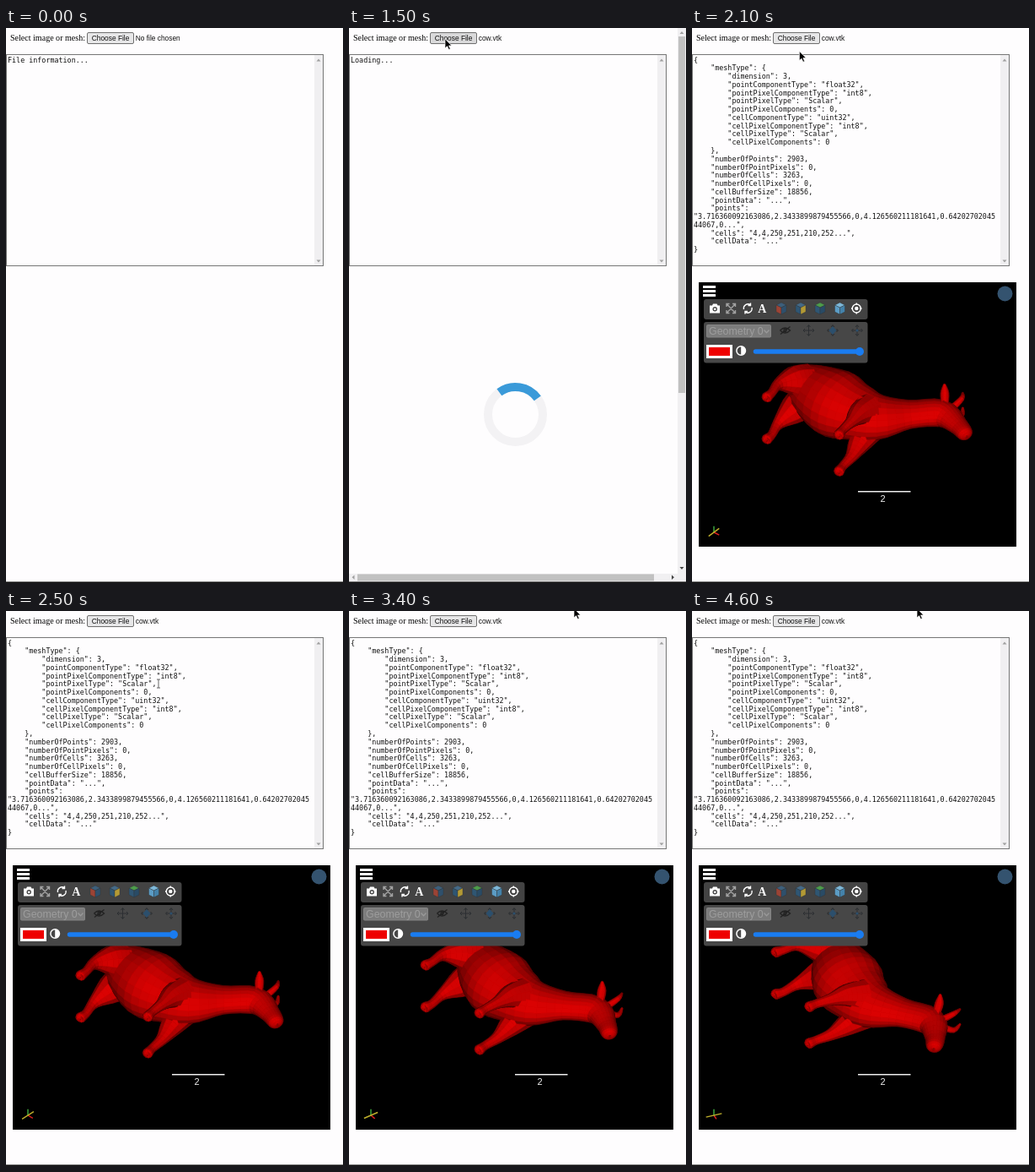
Recreate the animation shown at these times as an HTML page with a canvas. Size 400x657 px, loop 4.7 s.

```html
<!DOCTYPE html>
<html lang="en">
<head>
<meta charset="utf-8">
<title>Mesh viewer</title>
<style>
html, body { margin: 0; width: 100%; height: 100%; overflow: hidden; background: #fefdfe; }
svg, canvas { position: absolute; left: 0; top: 0; }
pre { position: absolute; left: 2px; top: 33.6px; margin: 0; color: #111;
  font: 8.4px/9.77px "DejaVu Sans Mono", monospace; }
.sans { font-family: "Liberation Sans", Arial, sans-serif; }
.serif { font-family: "Liberation Serif", Times, serif; }
</style>
</head>
<body>
<svg width="400" height="657">
  <text class="serif" x="5" y="15" font-size="10.05">Select image or mesh:</text>
  <rect id="button" x="96.5" y="5.5" width="55" height="13" rx="1.5" stroke="#6f6f6f"/>
  <g class="sans" font-size="8.4" fill="#111">
    <text x="101.7" y="15">Choose File</text>
    <text id="file" x="153.7" y="15"></text>
  </g>
  <rect x=".5" y="31.5" width="376" height="250" fill="none" stroke="#767676"/>
  <path d="M366 32h10v249h-10z" fill="#f0eff1"/>
  <path d="M368.5 39.5l2.5-3 2.5 3zM368.5 274.5l2.5 3 2.5-3z" fill="#a0a0a0"/>

  <g id="loading">
    <path d="M390 0h10v656H0v-10h390z" fill="#f1f0f2"/>
    <path d="M391 10h8v422h-8zM10 646.5h352v8H10z" fill="#c1c1c1"/>
    <path d="M392.5 7l2.5-3 2.5 3zM6.5 647.5l-3 2.8 3 2.8z" fill="#a0a0a0"/>
    <path d="M392.5 638l2.5 3 2.5-3zM383 647.5l3 2.8-3 2.8z" fill="#444"/>
    <g fill="none" stroke-width="10">
      <circle cx="197.5" cy="457.5" r="32.5" stroke="#f3f2f4"/>
      <path id="arc" d="M174.52 434.52a32.5 32.5 0 0 1 45.96 0" stroke="#3a9ad9"/>
    </g>
  </g>
  <path d="M0 656.3h400" stroke="#111" stroke-width="1.5"/>
</svg>
<pre id="info"></pre>
<canvas id="scene" width="400" height="657"></canvas>

<svg width="400" height="657">
  <g id="tools">
    <path d="M13 306.5h15M13 311.5h15M13 316.5h15" stroke="#fff" stroke-width="2.8"/>
    <circle cx="371.5" cy="314.5" r="9" fill="#34536f"/>
    <rect x="14" y="321" width="194.5" height="24" rx="3" fill="#434343"/>
    <rect x="14" y="348" width="194.5" height="48.5" rx="3" fill="#474747"/>

    <g fill="#fff">
      <path d="M21 328.5h3l1-2h4.5l1 2h2.5v9H21z"/>
      <circle cx="27.2" cy="332.8" r="2.7" fill="#434343"/><circle cx="27.2" cy="332.8" r="1.4"/>
      <text class="serif" x="78.3" y="337" font-size="14" font-weight="bold">A</text>
      <circle cx="195.3" cy="332" r="2.2"/>
    </g>
    <g fill="none" stroke="#fff" stroke-width="1.4">
      <path d="M61.5 333a5 5 0 0 1 8-5M71 331a5 5 0 0 1-8 5M69.5 325.5v3h-3M63 338.5v-3h3"/>
      <circle cx="195.3" cy="332" r="5"/>
      <path d="M195.3 325.5v2M195.3 336.5v2M189 332h2M199.5 332h2"/>
      <path d="M41 330v-3.5h3.5M48 326.5h3.5v3.5M51.5 334v3.5H48M44.5 337.5H41V334M41 326.5l10.5 11M51.5 326.5l-10.5 11" stroke="#a2a2a2"/>
    </g>
    <g id="cubes" stroke="#333" stroke-width=".4"></g>

    <rect x="17.5" y="351.5" width="76" height="14.5" rx="1" fill="#7c7c7c" stroke="#858585"/>
    <text class="sans" x="20" y="363" font-size="12.4" fill="#9d9d9d">Geometry 0</text>
    <g fill="none" stroke="#222" stroke-width="1.3">
      <path d="M85.5 357.5l3 3.2 3-3.2" stroke="#999"/>
      <path d="M104.5 358q6-6 12 0q-6 6-12 0M105 362.5l11.5-9"/><circle cx="110.5" cy="358" r="1.6"/>
      <path id="cross" d="M138.5 352v12M132.5 358h12M136.5 354l2-2.5 2 2.5M136.5 362l2 2.5 2-2.5M134 356l-2 2 2 2M143 356l2 2-2 2" stroke="#2c2f32" stroke-width="1"/>
      <use href="#cross" x="28.5"/><use href="#cross" x="57.5"/>
    </g>
    <path d="M167 353l4.5 5-4.5 5-4.5-5z" fill="#2c4f6c"/>
    <circle cx="196" cy="358" r="1.6" fill="#2c4f6c"/>

    <path d="M18.5 376.5h28v13h-28z" fill="#e00" stroke="#fff" stroke-width="3"/>
    <circle cx="58.2" cy="382" r="5.3" fill="none" stroke="#fff" stroke-width="1.5"/>
    <path d="M58.2 377a5 5 0 0 1 0 10z" fill="#fff"/>
    <path d="M75.5 383H200" stroke="#1a7cf0" stroke-width="5.5" stroke-linecap="round"/>
    <circle cx="199" cy="383" r="5" fill="#1a7cf0"/>

    <path d="M197 548.7h62.5" stroke="#eee" stroke-width="1.5"/>
    <text class="sans" x="223.5" y="561" font-size="11" fill="#eee">2</text>
  </g>
  <path id="arrow" d="M0 0v11l2.6-2.4 1.9 4 1.8-.8-1.8-3.9h3.5z" stroke="#fff" stroke-width=".7"/>
  <path id="beam" d="M-2-5h4M-2 5h4M0-5V5" fill="none" stroke="#555" stroke-width=".9"/>
</svg>

<script>
const $ = id => document.getElementById(id);
const LOOP = 4700, STEP = 100, PICKED = 1500, LOADED = 1700;
const meshInfo = `{
    "meshType": {
        "dimension": 3,
        "pointComponentType": "float32",
        "pointPixelComponentType": "int8",
        "pointPixelType": "Scalar",
        "pointPixelComponents": 0,
        "cellComponentType": "uint32",
        "cellPixelComponentType": "int8",
        "cellPixelType": "Scalar",
        "cellPixelComponents": 0
    },
    "numberOfPoints": 2903,
    "numberOfPointPixels": 0,
    "numberOfCells": 3263,
    "numberOfCellPixels": 0,
    "cellBufferSize": 18856,
    "pointData": "...",
    "points":
"3.716360092163086,2.3433899879455566,0,4.126560211181641,0.64202702045
44067,0...",
    "cells": "4,4,250,251,210,252...",
    "cellData": "..."
}`;

// Vectors are [forward, down, sideways].
const sub = (a, b) => a.map((v, i) => v - b[i]);
const cross = (a, b) => [a[1] * b[2] - a[2] * b[1], a[2] * b[0] - a[0] * b[2], a[0] * b[1] - a[1] * b[0]];
const unit = a => a.map(v => v / (Math.hypot(...a) || 1));
const mix = (a, b, u) => a.map((v, i) => v + (b[i] - v) * u);

// Catmull-Rom through the keys
function spline(keys, s) {
  const i = Math.min(Math.floor(s), keys.length - 2), f = s - i;
  const at = k => keys[Math.max(0, Math.min(keys.length - 1, k))];
  const [a, b, c, d] = [at(i - 1), at(i), at(i + 1), at(i + 2)];
  return b.map((v, k) => v + f / 2 * (c[k] - a[k] +
    f * (2 * a[k] - 5 * v + 4 * c[k] - d[k] + f * (3 * (v - c[k]) + d[k] - a[k]))));
}

// Quads of a tube; each key is a spine point with height and width radii.
function tube(keys, sides, cuts = 4) {
  const rings = [], faces = [], n = (keys.length - 1) * cuts;
  for (let i = 0; i <= n; i++) {
    const s = i / cuts, [u, v, w, high, wide] = spline(keys, s);
    const ahead = spline(keys, Math.min(s + .1, keys.length - 1)).slice(0, 3);
    const behind = spline(keys, Math.max(s - .1, 0)).slice(0, 3);
    const t = unit(sub(ahead, behind)), p = unit(cross(t, [0, 0, 1])), q = cross(t, p);
    rings.push(Array.from({ length: sides }, (_, k) => {
      const a = k / sides * 2 * Math.PI, c = Math.cos(a) * high, d = Math.sin(a) * wide;
      return [u, v, w].map((x, m) => x + p[m] * c + q[m] * d);
    }));
  }
  for (let i = 0; i < n; i++)
    for (let k = 0; k < sides; k++) {
      const m = (k + 1) % sides;
      faces.push([rings[i][k], rings[i][m], rings[i + 1][m], rings[i + 1][k]]);
    }
  return faces;
}
const pair = keys => [-1, 1].flatMap(side =>
  tube(keys.map(([u, v, w, r]) => [u, v, w * side, r, r]), 10));

const cow = [
  // rump, barrel, shoulder, neck, head
  ...tube([
    [-101,-4,0,4,4], [-88,-5,0,25,25], [-37,0,0,42,39], [-4,-2,0,37,32], [22,-11,0,31,25],
    [48,-38,0,20,15], [76,-63,0,18,15], [106,-57,0,12,10], [124,-49,0,9,8], [128,-47,0,2,2]
  ], 22),
  ...pair([[-78,2,14,20], [-83,20,22,17], [-86,44,29,7], [-80,64,31,5], [-79,75,31,6], [-78,77,31,1]]),
  ...pair([[16,0,15,18], [19,22,22,13], [25,44,26,7], [28,64,27,5], [31,75,27,6], [32,77,27,1]]),
  ...pair([[76,-70,8,4], [71,-76,20,5], [69,-78,31,1]]),
  ...pair([[84,-74,5,4], [87,-88,12,3], [80,-99,11,1]])
];

// Turns about the sideways axis, seen from a fixed slant; z points to the viewer.
function project([u, v, w], angle) {
  const c = Math.cos(angle), s = Math.sin(angle), depth = u * s + v * c;
  return [u * c - v * s, .6 * depth + .8 * w, .8 * depth - .6 * w];
}

const ctx = $("scene").getContext("2d");
function drawScene(t) {
  const angle = (34 + (t - LOADED) * .012) * Math.PI / 180;
  ctx.fillStyle = "#000";
  ctx.fillRect(8, 301, 377, 313);

  ctx.save();
  ctx.translate(197, 457);
  ctx.lineWidth = .5;
  const faces = cow.map(face => {
    const pts = face.map(p => project(p, angle));
    return { pts, z: pts.reduce((sum, p) => sum + p[2], 0) };
  }).sort((a, b) => a.z - b.z);
  for (const { pts } of faces) {
    const facing = Math.abs(unit(cross(sub(pts[2], pts[0]), sub(pts[3], pts[1])))[2]);
    ctx.fillStyle = ctx.strokeStyle = `rgb(${Math.round(60 + 160 * facing)} 2 2)`;
    ctx.beginPath();
    pts.forEach(p => ctx.lineTo(p[0], p[1]));
    ctx.closePath();
    ctx.fill();
    ctx.stroke();
  }
  ctx.restore();

  ctx.lineWidth = 1.4;
  const axis = (color, from, to) => {
    const a = project(from, angle), b = project(to, angle);
    ctx.strokeStyle = color;
    ctx.beginPath();
    ctx.moveTo(26 + a[0], 597 + a[1]);
    ctx.lineTo(26 + b[0], 597 + b[1]);
    ctx.stroke();
  };
  axis("#e02020", [0, 0, 0], [8, 0, 0]);
  axis("#3fae3f", [0, 0, 0], [0, 0, -9]);
  axis("#c0b02c", [0, 10, 0], [0, -10, 0]);
}

const cube = (x, top, left, right) => [
  [`M${x} 325l6 3-6 3-6-3z`, top], [`M${x - 6} 328l6 3v8l-6-3z`, left], [`M${x + 6} 328l-6 3v8l6-3z`, right]
].map(([d, fill]) => `<path d="${d}" fill="${fill}"/>`).join("");
$("cubes").innerHTML =
  cube(106, "#3d5f7b", "#9c4335", "#2f506c") + cube(129, "#456a87", "#2f5673", "#b39a35") +
  cube(152, "#4d9c4b", "#2f5673", "#294b65") + cube(175.5, "#7db7d8", "#5b9cc4", "#4482aa");

// Pointer stops: time, x, y
const stops = [[100,190,0], [300,114,13], [2000,114,13], [2500,181,86], [3200,267,-3], [LOOP,267,-3]];
function pointerAt(t) {
  const i = Math.max(1, stops.findIndex(s => s[0] >= t)), a = stops[i - 1], b = stops[i];
  return mix(a, b, (t - a[0]) / (b[0] - a[0])).slice(1);
}

const show = (id, on) => $(id).style.visibility = on ? "visible" : "hidden";

function draw(t) {
  const loaded = t >= LOADED, picked = t >= PICKED;
  $("file").textContent = picked ? "cow.vtk" : "No file chosen";
  $("info").textContent = loaded ? meshInfo : picked ? "Loading..." : "File information...";
  show("loading", picked && !loaded);
  show("tools", loaded);
  show("scene", loaded);
  $("arc").setAttribute("transform", `rotate(${9 + (t - PICKED) * .18} 197.5 457.5)`);
  if (loaded) drawScene(t);

  const [x, y] = pointerAt(t), inText = y > 31 && y < 282 && x < 366;
  for (const id of ["arrow", "beam"]) {
    show(id, t >= 100 && inText === (id === "beam"));
    $(id).setAttribute("transform", `translate(${x} ${y})`);
  }
  const hover = t >= 100 && x > 96 && x < 152 && y > 5 && y < 19;
  $("button").setAttribute("fill", hover ? "#d9d9da" : "#e7e7e8");
}

const start = performance.now();
let last = -1;
function tick(now) {
  const t = Math.floor(Math.max(0, now - start) % LOOP / STEP) * STEP;
  if (t !== last) draw(last = t);
  requestAnimationFrame(tick);
}
draw(0);
requestAnimationFrame(tick);
</script>
</body>
</html>
```
